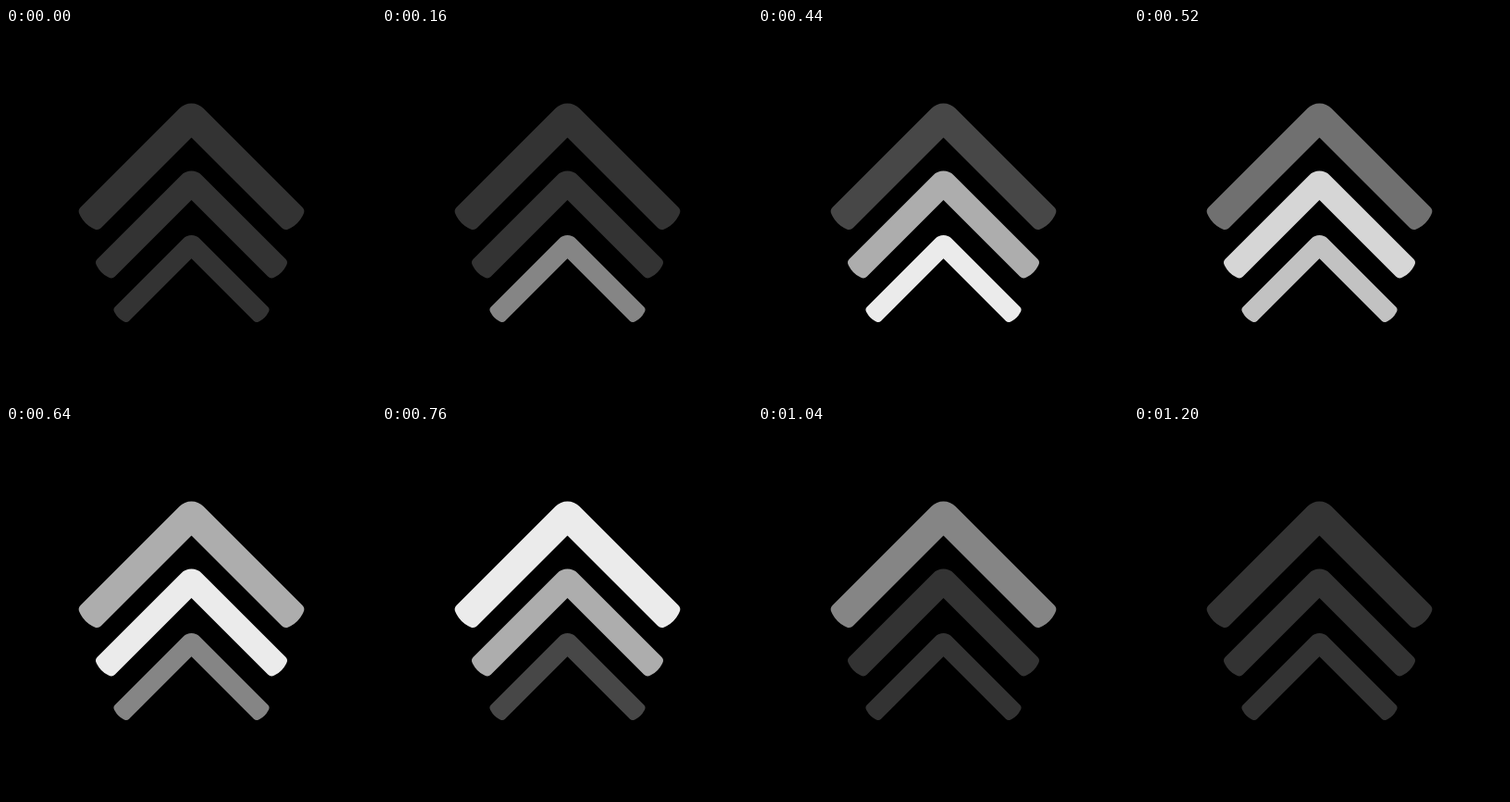
Recreate the animation shown at these times as an HTML page with a canvas. Size 400 by 400 pixels, loop 1240 ms.

```html
<!DOCTYPE html>
<html>
<head>
<meta charset="utf-8">
<style>
  html, body { margin: 0; height: 100%; overflow: hidden; background: #000; }
  canvas { display: block; }
</style>
</head>
<body>
<canvas id="stage" width="400" height="400"></canvas>
<script>
const ctx = document.getElementById('stage').getContext('2d');
const CENTER = 200.5, STEP = 40, STEPS = 31;

// apex: y of the centre line's peak, width: half the vertical thickness,
// reach: half the overall span, start: step at which it begins to glow
function chevron(apex, width, reach, start) {
  const h = width / 2;
  const end = reach - h + 0.132 * h;
  const path = new Path2D();
  const corner = (side, along, across, r) =>
    [CENTER + side * (along - across), apex + along + across, r];
  const arm = side => [
    corner(side, end, h, 0.58 * h),
    corner(side, end + 0.314 * h, 0, 2.69 * h),
    corner(side, end, -h, 0.58 * h)
  ];
  const corners = [...arm(1), [CENTER, apex - width, 1.66 * h], ...arm(-1).reverse()];
  const notch = [CENTER, apex + width];
  path.moveTo(...notch);
  corners.forEach(([x, y, r], i) => {
    const [nextX, nextY] = corners[i + 1] || notch;
    path.arcTo(x, y, nextX, nextY, r);
  });
  path.closePath();
  return { path, start };
}

const chevrons = [
  chevron(96.2, 22.3, 121.75, 10),
  chevron(167, 19, 103.4, 5),
  chevron(234, 15.25, 84, 0)
];

function draw() {
  const step = Math.floor(performance.now() / STEP) % STEPS;
  ctx.fillStyle = '#000';
  ctx.fillRect(0, 0, 400, 400);
  for (const { path, start } of chevrons) {
    const glow = Math.max(0, 1 - Math.abs(step - start - 10) / 10);
    const grey = Math.round(51 + 204 * glow);
    ctx.fillStyle = `rgb(${grey}, ${grey}, ${grey})`;
    ctx.fill(path);
  }
  requestAnimationFrame(draw);
}
draw();
</script>
</body>
</html>
```
